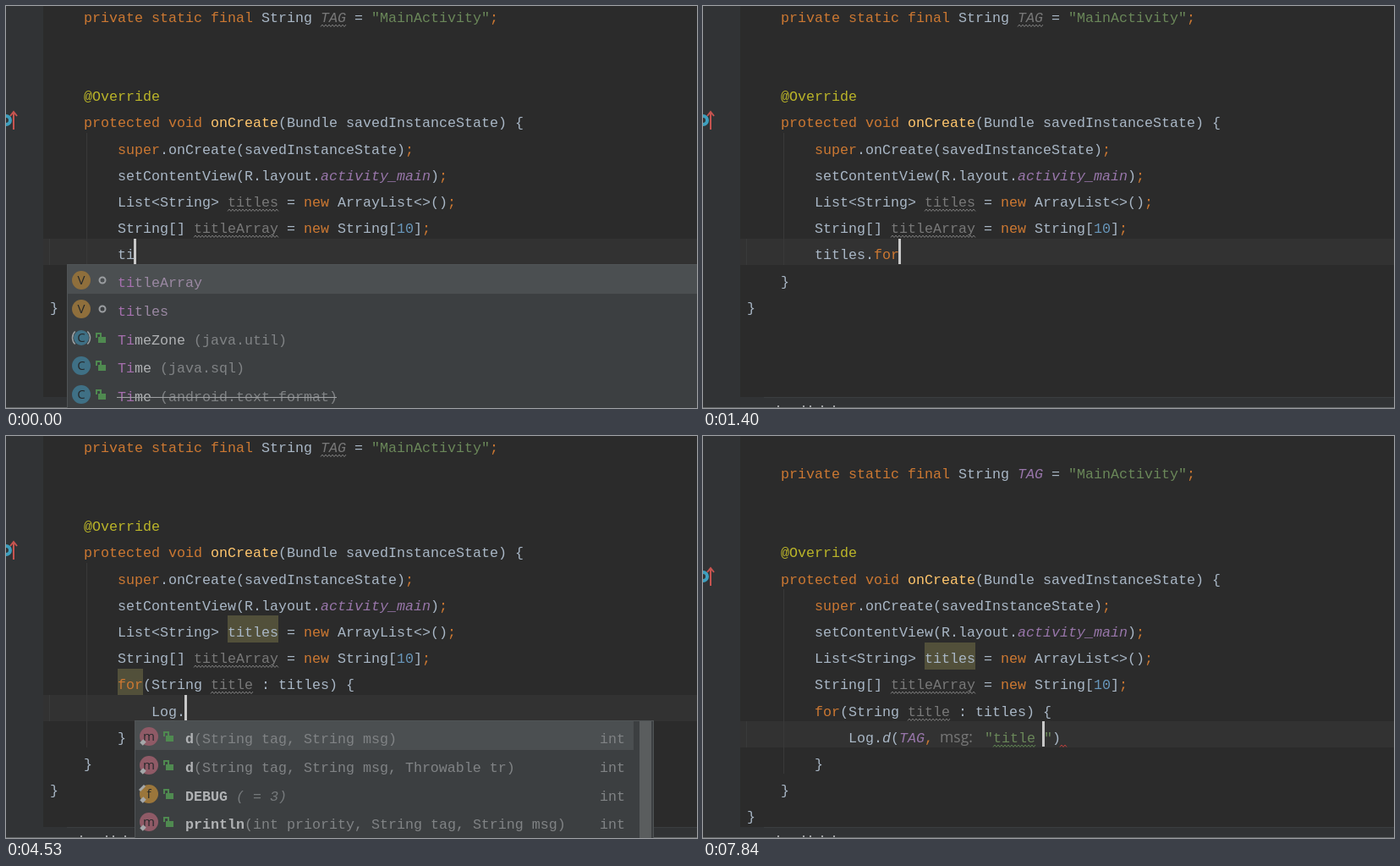
Animation of 817x475 px, one loop 7.99 s. Source, as an HTML page with a canvas:

```html
<!DOCTYPE html>
<html>
<head>
<meta charset="utf-8">
<style>
  html, body { margin: 0; width: 100%; height: 100%; overflow: hidden; background: #2b2b2b; }
  canvas { display: block; }
</style>
</head>
<body>
<canvas id="stage" width="817" height="475"></canvas>
<script>
const ctx = document.getElementById('stage').getContext('2d');
const LOOP = 7990, CELL = 10, LEFT = 52, ITEM = 33.8;
const MONO = '"Liberation Mono", monospace', SANS = '"Open Sans", sans-serif';
const KEYWORDS = /^(private|static|final|protected|void|super|new|for|[;,])$/;
const plain = '#a9b7c6', orange = '#cc7832', purple = '#9876aa', gray = '#787878', olive = '#52503a';

const rowTop = row => Math.floor(31.2 * row - 5.6);
const baseline = row => Math.round(18.6 + 31.2 * row);
const latest = (steps, t) => steps.filter(s => s[0] <= t).pop()[1];

function rect(x, y, w, h, color) {
  ctx.fillStyle = color;
  ctx.fillRect(x, y, w, h);
}

function text(str, x, y, color, style = '') {
  ctx.font = `${style} 16.66px ${MONO}`;
  ctx.fillStyle = color;
  ctx.fillText(str, x, y);
}

function line(points, color, width = 1) {
  ctx.beginPath();
  points.forEach(([x, y]) => ctx.lineTo(x, y));
  ctx.strokeStyle = color;
  ctx.lineWidth = width;
  ctx.stroke();
}

function disc(x, y, r, color) {
  ctx.beginPath();
  ctx.arc(x, y, r, 0, 7);
  ctx.fillStyle = color;
  ctx.fill();
}

function ring(x, y, r, color, width, from = 0, to = 7) {
  ctx.beginPath();
  ctx.arc(x, y, r, from, to);
  ctx.strokeStyle = color;
  ctx.lineWidth = width;
  ctx.stroke();
}

function wave(x, end, row, color = '#7c7c7c') {
  const points = [], y = baseline(row) + 3;
  for (let i = 0; x + i * 2 <= end; i++) points.push([x + i * 2, y + (i % 2 ? 0 : 2.5)]);
  line(points, color);
}

function tokenColor(token) {
  if (KEYWORDS.test(token)) return orange;
  if (token[0] === '"') return '#6a8759';
  if (token[0] === '@') return '#bbb529';
  if (/^\d/.test(token)) return '#6897bb';
  return plain;
}

// custom maps a token to [color, font style]
function code(col, row, source, custom = {}) {
  let x = LEFT + col * CELL;
  for (const token of source.match(/"[^"]*"|@\w+|\w+|\s+|./g) || []) {
    const [color, style] = custom[token] || [tokenColor(token)];
    text(token, x, baseline(row), color, style);
    x += token.length * CELL;
  }
}

function padlock(x, y, color, open) {
  rect(x - 4, y - 1, 9, 7, color);
  line(open ? [[x - 6, y], [x - 6, y - 5], [x - 1, y - 5], [x - 1, y]]
            : [[x - 2, y], [x - 2, y - 5], [x + 3, y - 5], [x + 3, y]], color, 2);
}

const ICONS = { V: '#8f6f3c', C: '#3f7085', A: '#3f7085', m: '#8f5a66', f: '#9b763b', I: '#4b7c4c', E: '#3f7085', T: '#6b6e70' };

function icon(kind, x, y, marked) {
  const diamond = (cx, cy) => line([[cx - 2, cy + 2], [cx + 2, cy - 2]], '#a5a8aa', 5);
  disc(x, y, kind === 'A' ? 9 : 11, ICONS[kind]);
  if (kind === 'A') {
    ring(x, y, 10.5, '#9aa0a3', 1.5, -0.8, 0.8);
    ring(x, y, 10.5, '#9aa0a3', 1.5, 2.34, 3.94);
  }
  if (kind === 'E') {
    line([[x + 2, y - 6], [x - 4, y + 1], [x + 4, y - 1], [x - 2, y + 6]], '#25282a', 2);
  } else {
    ctx.font = `15px ${SANS}`;
    ctx.fillStyle = '#25282a';
    ctx.textAlign = 'center';
    ctx.fillText(kind === 'A' ? 'C' : kind, x, y + 5);
    ctx.textAlign = 'left';
  }
  if ('mfI'.includes(kind)) diamond(x - 7, y + 7);
  if (marked) line([[x - 11, y - 4], [x - 5, y - 10]], '#a5a8aa', 3);
}

// Each item: [icon, name, tail, type, flags]; flags: b bold, s struck, i italic tail, p private, k marked
function popup({ x, y, right = 817, items, match = 0, selected = 0, bar = false, height = 475 }) {
  const inner = bar ? 742 : right;
  rect(x, y, right - x, height, '#505456');
  rect(x + 1, y + 1, right - x - (right < 817 ? 2 : 1), height - 2, '#3c3f41');
  rect(x + 1, y + 1 + Math.round(selected * ITEM), inner - x - 1, 34, '#4b4f51');
  if (bar) rect(749, y + 1, 14, height, '#5a5d5e');
  items.forEach(([kind, name, tail = '', type = '', flags = ''], i) => {
    const top = y + Math.round(i * ITEM), mid = top + 19, base = top + 27;
    const has = flag => flags.includes(flag);
    icon(kind, x + 17, mid, has('k'));
    if (kind === 'V') ring(x + 42, mid, 3.5, '#9a9da0', 2);
    else if (kind !== 'T') padlock(x + 41, mid, has('p') ? '#b5623f' : '#4f8a50', !has('p'));
    const start = x + 60, style = has('b') ? 'bold' : '', end = start + name.length * CELL;
    text(name.slice(0, match), start, base, '#a56fae', style);
    text(name.slice(match), start + match * CELL, base, kind === 'V' ? '#9a88a2' : '#b0b2b4', style);
    text(tail, end, base, has('i') ? '#767a7c' : '#808385', has('i') ? 'italic' : '');
    text(type, inner - 10 - type.length * CELL, base, '#808385');
    if (has('s')) rect(start - 1, base - 5, (name + tail).length * CELL, 1, '#a0a2a4');
  });
}

const NAMES = [
  ['V', 'titleArray'], ['V', 'titles'], ['A', 'TimeZone', ' (java.util)'],
  ['C', 'Time', ' (java.sql)'], ['C', 'Time', ' (android.text.format)', '', 's']];
const LOOPS = [
  ['m', 'forEach', '(Consumer<? super String> action)', 'void', 'b'],
  ['T', 'for', ' for (T item : collection)'], ['T', 'fori', ' for (int i = 0; ...)'],
  ['T', 'forr', ' for (int i = n; ...)'], ['T', 'format', ' String.format(expr)']];
const CLASSES = [
  ['C', 'Log', ' (android.util)'], ['C', 'Long', ' (java.lang)'],
  ['C', 'LongDef', ' (android.support.annotation)'], ['C', 'LongStream', ' (java.util.stream)']];
const MEMBERS = [
  ['m', 'd', '(String tag, String msg)', 'int', 'b'],
  ['m', 'd', '(String tag, String msg, Throwable tr)', 'int', 'b'],
  ['f', 'DEBUG', ' ( = 3)', 'int', 'bik'],
  ['m', 'println', '(int priority, String tag, String msg)', 'int', 'b']];
const TAGS = [
  ['f', 'TAG', ' ( = "MainActivity")', '', 'bipk'], ['C', 'Tag', ' (android.nfc)', '', 'k'],
  ['I', 'TagHandler', ' (android.text.Html)'], ['E', 'TagLostException', ' (android.nfc)']];

const FIRST = [[0, 'ti'], [680, 'titles'], [950, 'titles.'], [1100, 'titles.f'], [1250, 'titles.fo'], [1400, 'titles.for']];
const CALL = [[0, ''], [4100, 'L'], [4240, 'Lo'], [4390, 'Log'], [4530, 'Log.'], [4680, 'Log.d'],
  [4880, 'Log.d()'], [5080, 'Log.d(T)'], [5240, 'Log.d(TAG)'], [6680, 'Log.d(TAG,']];
const MESSAGE = [[0, ''], [7420, 't'], [7560, 'tit'], [7700, 'title'], [7840, 'title ']];

function background(top, caretRow, endRow) {
  rect(0, 0, 817, 475, '#2b2b2b');
  rect(0, 0, 44, 475, '#313335');
  rect(44, rowTop(caretRow), 773, 31, '#323232');
  rect(51, rowTop(caretRow), 1, 31, '#393a3a');
  rect(95, rowTop(5 + top), 1, rowTop(endRow) - rowTop(5 + top), '#393939');
  rect(0, 462, 817, 13, '#313335');
  rect(72, 462, 745, 1, '#3b3e40');
  [88, 118, 126, 140, 154].forEach(x => rect(x, 472, 2, 2, '#a0a2a4'));
  rect(0, 474, 817, 1, '#606364');
  const y = 135 + 31 * top;
  ring(0, y, 5, '#3e9fbe', 4);
  line([[9, y + 11], [9, y - 9]], '#c75450', 2);
  line([[5, y - 5], [9, y - 10], [13, y - 5]], '#c75450', 2);
}

function method(t, top) {
  const lit = t >= 2370, tagUsed = t >= 5530;
  if (lit) {
    rect(262, rowTop(7 + top), 60, 32, olive);
    if (!tagUsed) rect(132, rowTop(9 + top), 30, 31, olive);
  }
  code(4, top, 'private static final String TAG = "MainActivity";', { TAG: [tagUsed ? purple : gray, 'italic'] });
  if (!tagUsed) wave(372, 403, top);
  code(4, 3 + top, '@Override');
  code(4, 4 + top, 'protected void onCreate(Bundle savedInstanceState) {', { onCreate: ['#ffc66d'] });
  code(8, 5 + top, 'super.onCreate(savedInstanceState);');
  code(8, 6 + top, 'setContentView(R.layout.activity_main);', { activity_main: [purple, 'italic'] });
  code(8, 7 + top, 'List<String> titles = new ArrayList<>();', { titles: [lit ? plain : gray] });
  if (!lit) wave(262, 322, 7 + top);
  code(8, 8 + top, 'String[] titleArray = new String[10];', { titleArray: [gray] });
  wave(222, 322, 8 + top);
}

function call(t, row) {
  const typed = latest(CALL, t), resolved = t >= 5530;
  const custom = resolved ? { d: [plain, 'italic'], TAG: [purple, 'italic'] } : {};
  let caret = 172 + typed.replace(')', '').length * CELL;
  if (t >= 4880 && t < 5530) {
    const bracket = ['#ffef28', 'bold'];
    custom['('] = custom[')'] = bracket;
    rect(222, rowTop(row), 10, 31, '#3b514d');
    rect(162 + typed.length * CELL, rowTop(row), 10, 31, '#3b514d');
  }
  code(12, row, typed, custom);
  if (t >= 6680) {
    const message = latest(MESSAGE, t), word = message.trim();
    ctx.font = `17.5px ${SANS}`;
    ctx.fillStyle = gray;
    ctx.fillText('msg:', 280, baseline(row));
    code(28.1, row, `"${message}")`);
    if (word) wave(343, 343 + word.length * CELL, row, '#5f8552');
    caret = 342 + message.length * CELL;
    if (t >= 6830) wave(caret + 20, caret + 29, row, '#bc3f3c');
  }
  return caret;
}

function overlay(t) {
  const typed = latest(CALL, t);
  if (t < 270) return { x: 72, y: 305, items: NAMES, match: 2 };
  if (t < 680) return { x: 72, y: 305, items: NAMES, match: 2, selected: 1 };
  if (t >= 1100 && t < 1400) return { x: 142, y: 305, items: LOOPS, match: t < 1250 ? 1 : 2 };
  if (t >= 1990 && t < 2180) return { x: 182, y: 305, right: 423, height: 70, items: [['V', 'title'], ['V', 's']] };
  if (t >= 4100 && t < 4530) return { x: 112, y: 336, items: CLASSES, match: typed.length };
  if (t >= 4530 && t < 4880) return { x: 152, y: 336, right: 766, bar: true, items: MEMBERS, match: t < 4680 ? 0 : 1 };
  if (t >= 5080 && t < 5390) return { x: 172, y: 336, items: TAGS, match: t < 5240 ? 1 : 3 };
}

function caretShown(t) {
  const hidden = [[270, 680], [3240, 3380], [3820, 4100], [6370, 6680]];
  return !hidden.some(([from, to]) => t >= from && t < to);
}

function draw(t) {
  const top = t >= 6680 ? 1 : 0, low = t >= 5940 ? 1 : 0, expanded = t >= 1530;
  const endRow = expanded ? 12 + low : 10;
  const caretRow = t < 3240 ? 9 : 10 + low;
  let caret;
  background(top, caretRow, endRow);
  method(t, top);
  if (expanded) {
    const braces = t >= 2370 && t < 3240, brace = [braces ? '#ffef28' : plain, braces ? 'bold' : ''];
    if (braces) {
      rect(402, rowTop(9), 10, 31, '#3b514d');
      rect(132, rowTop(11), 10, 31, '#3b514d');
    }
    code(8, 9 + top, 'for(String title : titles) {', { title: [gray], '{': brace });
    if (t >= 1990) wave(242, 292, 9 + top);
    code(8, 11 + low, '}', { '}': brace });
    caret = call(t, 10 + low);
    if (t < 3240) caret = braces ? 412 : 292;
  } else {
    const typed = latest(FIRST, t);
    code(8, 9, typed);
    caret = 132 + typed.length * CELL;
  }
  code(4, endRow, '}');
  code(0, endRow + 1, '}');
  const list = overlay(t);
  if (list) popup(list);
  if (caretShown(t)) rect(caret - 1, rowTop(caretRow), 3, 30, '#c8c8c8');
}

function tick() {
  draw(performance.now() % LOOP);
  requestAnimationFrame(tick);
}
tick();
</script>
</body>
</html>
```
